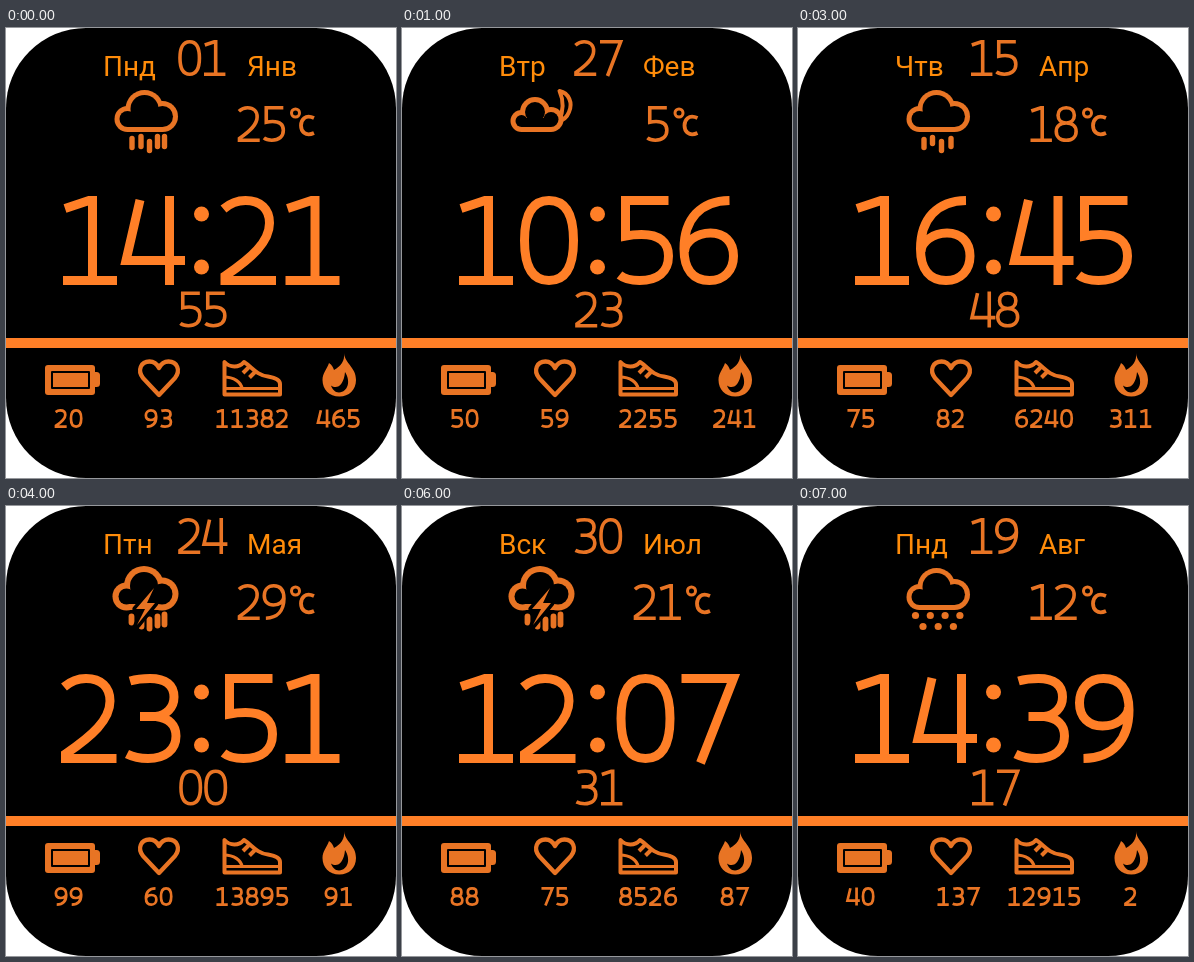
An HTML page with a canvas that plays this animation: 390x450 px, repeating every 8000 ms.

```html
<!DOCTYPE html>
<html lang="ru">
<head>
<meta charset="utf-8">
<title>Watch face</title>
<style>
html, body { margin: 0; width: 100%; height: 100%; overflow: hidden; background: #fff; }
canvas { display: block; width: 390px; height: 450px; }
</style>
</head>
<body>
<canvas id="face" width="390" height="450"></canvas>
<script>
const ctx = document.getElementById('face').getContext('2d');
const BRIGHT = '#ff7f27', DIM = '#e87424', LABEL = '#ff8c0a', BLACK = '#000';
const CELL_W = 63, CELL_H = 89;

// Digit centre lines in a 63 x 89 cell
const SIX = 'M53 4.5C24 5 7.5 23 7.5 53C7.5 74 17 84.5 33 84.5C48 84.5 57 74 57 60C57 46 48 37 34 37C20 37 8 46 8 56';
const glyphs = {
  0: 'M32 4.5C49 4.5 56.5 19 56.5 44.5S49 84.5 32 84.5S7.5 70 7.5 44.5S15 4.5 32 4.5Z',
  1: 'M7 12.5L31 4.5H34.5V84.5M5 84.5H59',
  2: 'M6 13C13 7 20 4.5 28 4.5C43 4.5 52 13 52 27C52 46 34 62 7.5 80V84.5H58.5',
  3: 'M9 7C16 5 22 4.5 29 4.5C45 4.5 53 11 53 23C53 34 45 41 35 42.5H19M35 42.5C48 44 55 51 55 62C55 76 44 84.5 27 84.5C19 84.5 12 83 6 80',
  4: 'M19 4L5 64.5H64M48.5 0V89',
  5: 'M55 4.5H12V40C17 39 22 38.5 28 38.5C46 38.5 55 46 55 60C55 76 44 84.5 26 84.5C18 84.5 11 83 6 79',
  6: SIX,
  7: 'M5 4.5H57L24 89',
  8: 'M32 4.5C45 4.5 52.5 12 52.5 23S45 42 32 42S11.5 34 11.5 23S19 4.5 32 4.5ZM32 42C48 42 57 50 57 63S48 84.5 32 84.5S7 76 7 63S16 42 32 42Z'
};
const digitPaths = Object.values(glyphs).map(d => new Path2D(d));
digitPaths[9] = new Path2D();
digitPaths[9].addPath(new Path2D(SIX), new DOMMatrix([-1, 0, 0, -1, 64, 89]));

const states = [
  { day: 'Пнд', date: '01', month: 'Янв', sky: 'downpour', temp: '25', time: '1421', sec: '55', stats: ['20', '93', '11382', '465'] },
  { day: 'Втр', date: '27', month: 'Фев', sky: 'night', temp: '5', time: '1056', sec: '23', stats: ['50', '59', '2255', '241'] },
  { day: 'Срд', date: '20', month: 'Мрт', sky: 'rain', temp: '13', time: '2018', sec: '37', stats: ['3', '111', '10086', '131'] },
  { day: 'Чтв', date: '15', month: 'Апр', sky: 'rain', temp: '18', time: '1645', sec: '48', stats: ['75', '82', '6240', '311'] },
  { day: 'Птн', date: '24', month: 'Мая', sky: 'storm', temp: '29', time: '2351', sec: '00', stats: ['99', '60', '13895', '91'] },
  { day: 'Суб', date: '22', month: 'Июн', sky: 'snow', temp: '-9', time: '0919', sec: '04', stats: ['47', '146', '4383', '358'] },
  { day: 'Вск', date: '30', month: 'Июл', sky: 'storm', temp: '21', time: '1207', sec: '31', stats: ['88', '75', '8526', '87'] },
  { day: 'Пнд', date: '19', month: 'Авг', sky: 'snow', temp: '12', time: '1439', sec: '17', stats: ['40', '137', '12915', '2'] }
];

function stroke(path, width, color = DIM, cap = 'butt', join = 'round') {
  ctx.lineWidth = width;
  ctx.strokeStyle = color;
  ctx.lineCap = cap;
  ctx.lineJoin = join;
  ctx.stroke(typeof path === 'string' ? new Path2D(path) : path);
}

function fill(d, color = DIM) {
  ctx.fillStyle = color;
  ctx.fill(new Path2D(d));
}

function box(x, y, w, h, r, color = DIM) {
  ctx.fillStyle = color;
  ctx.beginPath();
  ctx.roundRect(x, y, w, h, r);
  ctx.fill();
}

function dot(x, y, r, color = DIM) {
  ctx.fillStyle = color;
  ctx.beginPath();
  ctx.arc(x, y, r, 0, Math.PI * 2);
  ctx.fill();
}

function digits(text, x, y, advance, height, width, color = DIM, glyphWidth = advance) {
  const inset = (advance - glyphWidth) / 2;
  [...text].forEach((ch, i) => {
    const path = new Path2D();
    path.addPath(digitPaths[ch],
      new DOMMatrix([glyphWidth / CELL_W, 0, 0, height / CELL_H, x + inset + i * advance, y]));
    stroke(path, width, color, 'butt', 'miter');
  });
}

const mediumDigits = (text, x, y) => digits(text, x, y, 25, 36, 3.6);

// Union of lobes, drawn solid and then hollowed out
function cloud(lobes, base, half = 2.5) {
  for (const [grow, color] of [[half, DIM], [-half, BLACK]]) {
    for (const [x, y, r] of lobes) dot(x, y, r + grow, color);
    const [left, , right] = lobes;
    box(left[0], left[1] - 3, right[0] - left[0], base + grow - left[1] + 3, 0, color);
  }
}

const bigCloud = () => cloud([[121.5, 91, 10.5], [138.5, 81, 16.5], [156.5, 88.5, 13]], 101.5);

function drops(list, width = 5.4) {
  for (const [x, top, bottom] of list)
    stroke(`M${x} ${top + 2.5}V${bottom - 2.5}`, width, DIM, 'round');
}

const skies = {
  downpour() {
    bigCloud();
    drops([[126, 108, 122], [135, 106, 121], [143.5, 111, 125], [151.5, 106, 121], [158.5, 106, 121]]);
  },
  rain() {
    bigCloud();
    drops([[126, 109, 122], [134.5, 107, 118], [143.5, 111, 125], [153, 108, 121]]);
  },
  storm() {
    cloud([[120.5, 90.5, 11], [138, 80, 17], [156, 88, 13.5]], 101, 3);
    drops([[125.5, 108, 119], [135.5, 112, 123], [143.5, 111, 125], [151.5, 108, 122], [158.5, 106, 121]], 5.8);
    const bolt = 'M148 82L130 103H139L131 119L149 97H141Z';
    stroke(bolt, 7, BLACK);
    fill(bolt);
  },
  snow() {
    bigCloud();
    for (let i = 0; i < 4; i++) dot(117.5 + i * 14.8, 109.5, 3.6);
    for (let i = 0; i < 3; i++) dot(125 + i * 15.2, 120.5, 3.6);
  },
  night() {
    stroke('M157.5 63C167 65 171 75 167 84C165 89 162 92 157 93C161 84 162 73 157.5 63Z', 4);
    cloud([[119.5, 93, 8.5], [133, 84, 12.5], [149, 91.5, 10]], 101.5);
  }
};

function temperature(text) {
  const negative = text[0] === '-';
  const number = negative ? text.slice(1) : text;
  const width = (negative ? 18 : 0) + number.length * 25 + 28;
  let x = 270 - width / 2;
  if (negative) {
    box(x, 92, 14, 3.5, 0);
    x += 17;
  }
  mediumDigits(number, x - 0.5, 78);
  x += number.length * 25;
  ctx.beginPath();
  ctx.arc(x + 8.5, 85, 4, 0, Math.PI * 2);
  ctx.lineWidth = 3;
  ctx.strokeStyle = DIM;
  ctx.stroke();
  stroke(`M${x + 27} 90C${x + 18} 86 ${x + 14} 92 ${x + 14} 97.5S${x + 18} 109 ${x + 27} 105`, 3.8);
}

function statIcons() {
  box(39, 337, 50, 30, 3);
  box(86, 344, 8, 15, 3.5);
  box(45, 343, 39, 18, 1, BLACK);
  box(47, 345, 35, 14, 0);

  stroke('M153 367L137 350C131 342 135 333.5 143.5 333.5C148.5 333.5 151.5 337 153 340C154.5 337 157.5 333.5 162.5 333.5C171 333.5 175 342 169 350Z', 4.3);

  // Shoe: outline, heel and sole, laces
  stroke('M218.5 334V366.5H274V356C274 351 268 349.5 262 348.5C250 347 246 339 238 334C233 340 224 340 218.5 334Z', 4);
  stroke('M218 349C228 349 235 354 236 360.5M218 360.5H274', 3.2);
  stroke('M237 345L243 339M243.5 349.5L249 344', 4);

  fill('M338 325C339 336 350 339 350 352C350 362 343 368.5 333.5 368.5C323 368.5 316.5 361 316.5 352C316.5 345 321 341 323 335C326 337 327 339 328 342C335 338 339 333 338 325Z');
  fill('M339 344C345 353 342 364 333 364.5C329 364.5 326 361 325 357.5C331 362 338 357 339 344Z', BLACK);
}

function stats(values) {
  const centers = [62.5, 152.5, 246, 332.5];
  values.forEach((value, i) => {
    const width = value.length * 15;
    const x = i === 1 ? 137.5 : centers[i] - width / 2;
    digits(value, x, 381.5, 15, 18, 2.7, DIM, 13.2);
  });
}

function draw(state) {
  ctx.clearRect(0, 0, 390, 450);
  ctx.save();
  ctx.beginPath();
  ctx.roundRect(0, 0, 390, 450, 80);
  ctx.clip();
  box(0, 0, 390, 450, 0, BLACK);

  ctx.font = '28px Roboto, sans-serif';
  ctx.fillStyle = LABEL;
  ctx.fillText(state.day, 97, 48);
  ctx.fillText(state.month, 241, 48);
  mediumDigits(state.date, 171, 12);

  skies[state.sky]();
  temperature(state.temp);

  digits(state.time.slice(0, 2), 52, 168, CELL_W, CELL_H, 9, BRIGHT);
  digits(state.time.slice(2), 211.5, 168, CELL_W, CELL_H, 9, BRIGHT);
  dot(195.5, 186, 7.5, BRIGHT);
  dot(195.5, 239, 7.5, BRIGHT);
  mediumDigits(state.sec, 172, 263.5);

  box(0, 310, 390, 10, 0, BRIGHT);
  statIcons();
  stats(state.stats);
  ctx.restore();
}

const start = performance.now();
function tick() {
  const elapsed = Math.max(0, performance.now() - start);
  draw(states[Math.floor(elapsed / 1000) % states.length]);
  requestAnimationFrame(tick);
}
tick();
</script>
</body>
</html>
```
